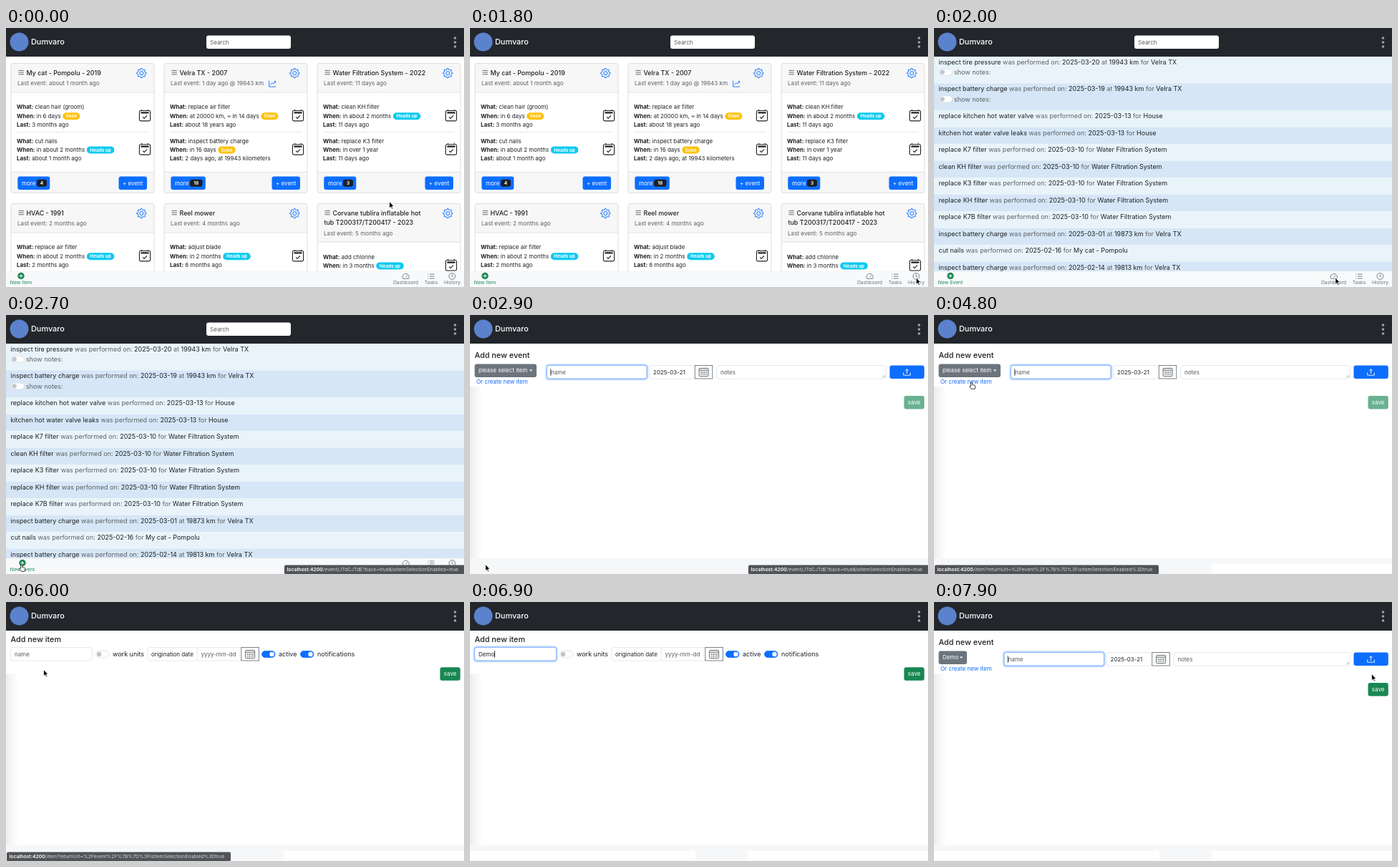
An HTML page that plays this animation: 640x362 px, repeating every 8 s.

```html
<!DOCTYPE html>
<html lang="en">
<head>
<meta charset="utf-8">
<title>Maintenance tracker</title>
<style>
  html, body { margin: 0; width: 100%; height: 100%; overflow: hidden; background: #fff; }
  svg { display: block; width: 100%; height: 100%; font-family: Inter, "Open Sans", sans-serif; }
  text { white-space: pre; }
</style>
</head>
<body>
<svg viewBox="0 0 640 362"></svg>
<script>
const svg = document.querySelector('svg');
const INK = '#1d2024', MUTED = '#5c6166', HINT = '#585b5e', BLUE = '#0d6efd',
      GREEN = '#198754', GRAY = '#6c757d', EDGE = '#dee2e6';
const APP = 'Dumvaro', CAT = 'My cat - Pompolu', CAR = 'Velra TX';
let parent = svg;

// Drawing helpers; y of a text is its visual middle
function add(tag, attrs, content) {
  const e = document.createElementNS('http://www.w3.org/2000/svg', tag);
  for (const k in attrs) e.setAttribute(k, attrs[k]);
  if (content) e.textContent = content;
  parent.appendChild(e);
  return e;
}
function group(draw, attrs = {}) {
  const outer = parent, g = add('g', attrs);
  parent = g;
  draw();
  parent = outer;
  return g;
}
const at = (x, y, draw) => group(draw, { transform: `translate(${x} ${y})` });
const box = (x, y, width, height, fill, rx = 0, more) =>
  add('rect', { x, y, width, height, fill, rx, ...more });
const dot = (cx, cy, r, fill, more) => add('circle', { cx, cy, r, fill, ...more });
const path = (d, stroke, width = 1, more) =>
  add('path', { d, stroke, 'stroke-width': width, fill: 'none', 'stroke-linejoin': 'round', ...more });
const text = (x, y, size, str, fill = INK, more) =>
  add('text', { x, y: y + size * .36, 'font-size': size, fill, ...more }, str);
const middle = { 'text-anchor': 'middle' };

function run(x, y, size, parts) {
  const line = text(x, y, size, '');
  const outer = parent;
  parent = line;
  for (const [str, fill = INK, weight = 400] of parts) add('tspan', { fill, 'font-weight': weight }, str);
  parent = outer;
  return line.getComputedTextLength();
}
function button(x, y, w, label, fill, more) {
  box(x, y, w, 18.5, fill, 3, more);
  if (label) text(x + w / 2, y + 9.3, 8, label, '#fff', middle);
}
function field(x, y, w, value, fill = HINT) {
  box(x, y, w, 18.5, '#fff', 3, { stroke: EDGE, 'stroke-width': .8 });
  return text(x + 5.5, y + 9.3, 8, value, fill);
}
const glow = (x, y, w) => {
  box(x - 1, y - 1, w + 2, 20.5, 'none', 4, { stroke: BLUE, 'stroke-opacity': .25, 'stroke-width': 2.4 });
  box(x, y, w, 18.5, 'none', 3, { stroke: '#86b7fe', 'stroke-width': .9 });
};
function toggle(x, y, on) {
  box(x, y - 4.5, 18.5, 9, on ? BLUE : '#fff', 4.5, { stroke: on ? BLUE : '#d5d8db', 'stroke-width': .7 });
  dot(on ? x + 14 : x + 4.6, y, 3.2, on ? '#fff' : '#c3c6c9');
}

// Icons
function gear(x, y) {
  let d = '';
  for (let i = 0; i < 32; i++) {
    const a = (i - .5) * Math.PI / 16, r = i % 4 < 2 ? 6.7 : 5;
    d += (i ? 'L' : 'M') + (Math.cos(a) * r).toFixed(2) + ' ' + (Math.sin(a) * r).toFixed(2);
  }
  at(x, y, () => {
    path(d + 'Z', BLUE, 1);
    dot(0, 0, 2.5, 'none', { stroke: BLUE });
  });
}
const bars = (x, y) => path(`M${x} ${y - 2.7}h7.4m-7.4 2.7h7.4m-7.4 2.7h7.4`, '#44484c', .8);
const checkDate = (x, y) => at(x, y, () => {
  box(-7.6, -6.7, 15.2, 14.4, 'none', 1.8, { stroke: INK, 'stroke-width': 1.1 });
  path('M-4.4 -8.3v1.6M4.4 -8.3v1.6', INK, 1.1);
  box(-5.6, -4.9, 11.2, 2.3, INK, .6);
  path('M-2.8 2.2l2 2 3.8 -4', INK, 1.2);
});
const dateButton = (x, y) => at(x, y, () => {
  box(0, 0, 24.5, 18.5, '#fff', 0, { stroke: GRAY, 'stroke-width': .9 });
  box(5.8, 4, 13, 11, 'none', .8, { stroke: '#55595d', 'stroke-width': .9 });
  path('M5.8 6.6h13', '#55595d', 1);
  path('M8 9.5h9M8 12.2h9', '#55595d', 1.3, { 'stroke-dasharray': '1.5 1' });
});
const plus = (x, y) => {
  dot(x, y, 4.7, GREEN);
  path(`M${x - 2.4} ${y}h4.8M${x} ${y - 2.4}v4.8`, '#fff', 1);
};

function navIcons() {
  path('M554.8 350.3a4.6 4.6 0 1 1 8 0zM558.8 348.2l2 -2.6', GRAY, .9);
  path('M592 344h6.5m-6.5 3h6.5m-6.5 3h6.5M589.4 344h1m-1 3h1m-1 3h1', GRAY, .9);
  dot(623.5, 347, 4.4, 'none', { stroke: GRAY, 'stroke-width': .9 });
  path('M623.5 344.3v3l1.8 1.2', GRAY, .9);
}
function footer(label, x) {
  box(0, 340, 640, 22, '#f8f9fa');
  path('M0 340h640', '#eceeef', .6);
  plus(x, 346.5);
  text(x, 356, 6.8, label, GREEN, middle);
  navIcons();
  [['Dashboard', 558.5], ['Tasks', 594], ['History', 623.5]]
    .forEach(([s, cx]) => text(cx, 356, 6.8, s, GRAY, middle));
}
function search() {
  box(280, 10.5, 118, 18.5, '#fff', 3);
  text(285, 20, 8, 'Search', HINT);
}

// Dashboard
function task(x, y, [what, when, tag, last]) {
  const row = (dy, key, value) => run(x + 8, y + dy, 7.95, [[key, INK, 700], [' ' + value]]);
  row(0, 'What:', what);
  const end = x + 8 + row(12.4, 'When:', when) + 2.7;
  row(24.6, 'Last:', last);
  if (tag) {
    const w = tag === 'Soon' ? 24 : 38.5;
    box(end, y + 7.7, w, 10, tag === 'Soon' ? '#ffc107' : '#0dcaf0', 5);
    text(end + w / 2, y + 12.7, 6.3, tag, '#fff', { ...middle, 'font-weight': 700 });
  }
  checkDate(x + 187, y + 11.7);
}
function card(x, y, titles, last, tasks, more) {
  const grow = (titles.length - 1) * 13.2, head = 40.5 + grow;
  box(x, y, 200, 181 + grow, '#fff', 3);
  box(x, y, 200, head, '#f7f7f7', 3);
  path(`M${x} ${y + head}h200`, '#dcdcdc', .8);
  bars(x + 10.5, y + 12.6);
  titles.forEach((s, i) =>
    text(x + (i ? 9.5 : 21.5), y + 12.8 + i * 13.7, 8.9, s, INK, { 'font-weight': 500 }));
  text(x + 9, y + 28 + grow, 8.12, last, MUTED);
  gear(x + 182.3, y + 13.6);
  tasks.forEach((item, i) => task(x, y + 61 + grow + i * 47.2, item));
  if (more) {
    path(`M${x + 8} ${y + 96}h184`, '#dedede', .7);
    box(x, y + 152, 200, 29, '#f7f7f7', 3);
    path(`M${x} ${y + 152}h200`, '#dcdcdc', .8);
    const w = more.length > 1 ? 17.5 : 14;
    button(x + 9.3, y + 158, w + 31, '', BLUE);
    text(x + 15, y + 167.2, 8, 'more', '#fff');
    box(x + 36, y + 162.3, w, 10, INK, 3);
    text(x + 36 + w / 2, y + 167.3, 6.5, more, '#fff', { ...middle, 'font-weight': 700 });
    button(x + 150.5, y + 158, 39.5, '+ event', BLUE);
  }
  box(x, y, 200, 181 + grow, 'none', 3, { stroke: '#d6d6d6', 'stroke-width': .8 });
}
function dashboard() {
  search();
  card(7, 49.5, [CAT + ' - 2019'], 'Last event: about 1 month ago', [
    ['clean hair (groom)', 'in 6 days', 'Soon', '3 months ago'],
    ['cut nails', 'in about 2 months', 'Heads up', 'about 1 month ago']], '4');
  card(221, 49.5, [CAR + ' - 2007'], 'Last event: 1 day ago @ 19943 km', [
    ['replace air filter', 'at 20000 km, ~ in 14 days', 'Soon', 'about 18 years ago'],
    ['inspect battery charge', 'in 16 days', 'Soon', '2 days ago, at 19943 kilometers']], '18');
  path('M367.6 73.5v8.6h9.4M369.4 79.6l2.4 -3 2 1.6 2.8 -3.8m-2 0h2.1v2.1', BLUE, .9);
  card(435, 49.5, ['Water Filtration System - 2022'], 'Last event: 11 days ago', [
    ['clean KH filter', 'in about 2 months', 'Heads up', '11 days ago'],
    ['replace K3 filter', 'in over 1 year', '', '11 days ago']], '3');
  card(7, 245.5, ['HVAC - 1991'], 'Last event: 2 months ago',
    [['replace air filter', 'in about 2 months', 'Heads up', '2 months ago']]);
  card(221, 245.5, ['Reel mower'], 'Last event: 4 months ago',
    [['adjust blade', 'in 2 months', 'Heads up', '8 months ago']]);
  card(435, 245.5, ['Corvane tublira inflatable hot', 'tub T200317/T200417 - 2023'], 'Last event: 5 months ago',
    [['add chlorine', 'in 3 months', 'Heads up', '5 months ago']]);
  footer('New Item', 21);
}

// Event log
function history() {
  search();
  const water = 'Water Filtration System', battery = 'inspect battery charge';
  const log = [
    ['inspect tire pressure', '03-20', CAR, 19943], [battery, '03-19', CAR, 19943],
    ['replace kitchen hot water valve', '03-13', 'House'], ['kitchen hot water valve leaks', '03-13', 'House'],
    ...['replace K7', 'clean KH', 'replace K3', 'replace KH', 'replace K7B'].map(s => [s + ' filter', '03-10', water]),
    [battery, '03-01', CAR, 19873], ['cut nails', '02-16', CAT], [battery, '02-14', CAR, 19813]];
  let y = 39.7;
  log.forEach(([name, day, item, km], i) => {
    const h = i < 2 ? 37.7 : 23.5;
    box(0, Math.max(y, 40), 640, h, i % 2 ? '#d6e6f6' : '#e9f4fa');
    run(6.5, y + 7.8, 9, [[name], [' was performed on: ', MUTED], ['2025-' + day],
      ...(km ? [[' at ', MUTED], [km + ' km']] : []), [' for ', MUTED], [item]]);
    if (i < 2) {
      toggle(7, y + 22, false);
      text(28, y + 22, 9, 'show notes:', MUTED);
    }
    y += h;
  });
  footer('New Event', 23);
}

// Forms
function formBase(title, y) {
  box(0, 100, 18, 240, 'url(#side)');
  box(0, 340, 640, 22, '#f6f7f8');
  text(6.5, y, 10.8, title, INK, { 'font-weight': 500 });
}
function eventForm(label, w, dx, more) {
  formBase('Add new event', 56.5);
  box(6.5, 68.5, w, 18.5, GRAY, 3);
  text(12, 77.6, 8, label, '#fff');
  add('path', { d: `M${w - 3.7} 76.4h4.6l-2.3 2.4z`, fill: '#fff' });
  text(9, 93, 8, 'Or create new item', BLUE);
  field(107.5 + dx, 70.5, 139.5, 'name');
  glow(107.5 + dx, 70.5, 139.5);
  path(`M${112.8 + dx} 75.3v9.4`, INK, .9);
  field(250.5 + dx, 70.5, 64, '2025-03-21', INK);
  dateButton(314.3 + dx, 70.5);
  field(344.5 + dx, 70.5, 237 - dx, 'notes');
  path('M576.5 87.3l3.6 -3.6m-1.4 3.6l1.4 -1.4', '#777', .6);
  button(586.5, 70.5, 48.3, '', BLUE);
  path('M605.7 80.4v3.8h9.6v-3.8M610.5 82v-6.2m-2.3 2.2l2.3 -2.3 2.3 2.3', '#fff', .9);
  button(606.5, 113, 28.3, 'save', GREEN, more);
}
let nameText, nameFocus, nameCaret;
function itemForm() {
  formBase('Add new item', 51.7);
  nameText = field(6.5, 63.5, 114, 'name');
  nameFocus = group(() => {
    glow(6.5, 63.5, 114);
    nameCaret = path('M0 68.2v9.4', INK, .9);
  });
  toggle(125.5, 73, false);
  text(149, 73, 9, 'work units');
  field(197.5, 63.5, 70, 'origination date', INK);
  field(267, 63.5, 62, 'yyyy-mm-dd');
  dateButton(328.8, 63.5);
  toggle(357.5, 73, true);
  text(381, 73, 9, 'active');
  toggle(411.5, 73, true);
  text(435, 73, 9, 'notifications');
  button(606.5, 91.3, 28.3, 'save', GREEN);
}
const status = (x, w, rest) => () => {
  box(x, 349.5, w, 13, '#505357', 2);
  run(x + 3.5, 355.6, 6.85, [['localhost:4200', '#fff', 600], [rest, '#d4d6d8']]);
};

// Build the stage
const side = add('linearGradient', { id: 'side' });
parent = side;
add('stop', { offset: 0, 'stop-color': '#000', 'stop-opacity': .07 });
add('stop', { offset: 1, 'stop-color': '#000', 'stop-opacity': 0 });
parent = svg;
box(0, 0, 640, 362, '#fff');
box(0, 0, 640, 40, '#23262b');
dot(18.5, 19.5, 13, '#5b82cc');
text(35, 19, 10.9, APP, '#fff', { 'font-weight': 500 });
[14, 20, 26].forEach(y => dot(627.5, y, 1.8, '#a0a2a4'));

// Each layer with the times it is visible
const layers = [
  [0, 1900, dashboard],
  [1900, 2900, history],
  [2900, 5700, () => eventForm('please select item', 86.5, 0, { 'fill-opacity': .65 })],
  [5700, 7700, itemForm],
  [7700, 8000, () => eventForm('Demo', 39.5, -9.5)],
  [3400, 8000, () => box(388, 348, 252, 13, '#fff')],
  [6300, 8000, () => box(0, 348, 315, 13, '#fff')],
  [2600, 3400, status(389, 252, '/event/JTdCJTdE?back=true&isItemSelectionEnabled=true')],
  [4200, 6300, status(1, 313, '/item?returnUrl=%2Fevent%2F%7B%7D%3FisItemSelectionEnabled%3Dtrue')]
].map(([from, to, draw]) => ({ from, to, g: group(draw) }));

const typed = 'Demo';
const typedWidths = [0, 1, 2, 3, 4].map(n => {
  nameText.textContent = typed.slice(0, n);
  return n ? nameText.getComputedTextLength() : 0;
});

const pointers = {
  arrow: group(() => path('M0 0v9.2l2.1 -1.9 1.4 3.2 1.5 -.7 -1.4 -3.1h2.8z', '#fff', .8, { fill: '#000' })),
  hand: group(() => path('M-.9 .6q.9 -1.2 1.8 0v3.3l3.6 .9q1 .4 .8 1.6l-.7 3.4h-4.8l-2.6 -3.6q0 -1.3 1.9 -.4z',
    '#111', .8, { fill: '#fff' })),
  beam: group(() => path('M-1.8 -5q1.8 0 1.8 1.2v7.6q0 1.2 -1.8 1.2M1.8 -5q-1.8 0 -1.8 1.2m0 7.6q0 1.2 1.8 1.2', '#222', .8))
};

// Pointer stops: time, x, y
const stops = [
  [0, 535.7, 242.6], [200, 535.7, 242.6], [600, 623.5, 349], [1900, 623.5, 349], [2400, 21.5, 348.5],
  [3800, 21.5, 348.5], [4200, 70.5, 85.5], [4600, 52.5, 93.5], [6000, 52.5, 94.5], [6500, 65, 73],
  [7100, 65, 73], [7600, 611.5, 100.5], [8000, 611.5, 100.5]];
const shapes = [[0, 'arrow'], [2400, 'hand'], [2900, 'arrow'], [4200, 'hand'], [5700, 'arrow'],
  [6400, 'beam'], [6600, ''], [7200, 'arrow']];

const show = (e, on) => { e.style.display = on ? '' : 'none'; };

function render(t) {
  for (const l of layers) show(l.g, t >= l.from && t < l.to);

  const n = Math.max(0, Math.min(4, Math.floor((t - 6500) / 100)));
  nameText.textContent = n ? typed.slice(0, n) : 'name';
  nameText.setAttribute('fill', n ? INK : HINT);
  show(nameFocus, t >= 6500 && t < 7600);
  nameCaret.setAttribute('transform', `translate(${12.3 + typedWidths[n]} 0)`);

  const i = stops.findIndex(s => s[0] > t);
  const [t0, x0, y0] = stops[i - 1], [t1, x1, y1] = stops[i];
  const p = (t - t0) / (t1 - t0), e = p * p * (3 - 2 * p);
  const shape = shapes.filter(s => s[0] <= t).pop()[1];
  for (const k in pointers) {
    show(pointers[k], k === shape);
    pointers[k].setAttribute('transform', `translate(${x0 + (x1 - x0) * e} ${y0 + (y1 - y0) * e})`);
  }
}

const start = performance.now();
function tick() {
  render(Math.floor((performance.now() - start) % 8000 / 100) * 100);
  requestAnimationFrame(tick);
}
tick();
</script>
</body>
</html>
```
